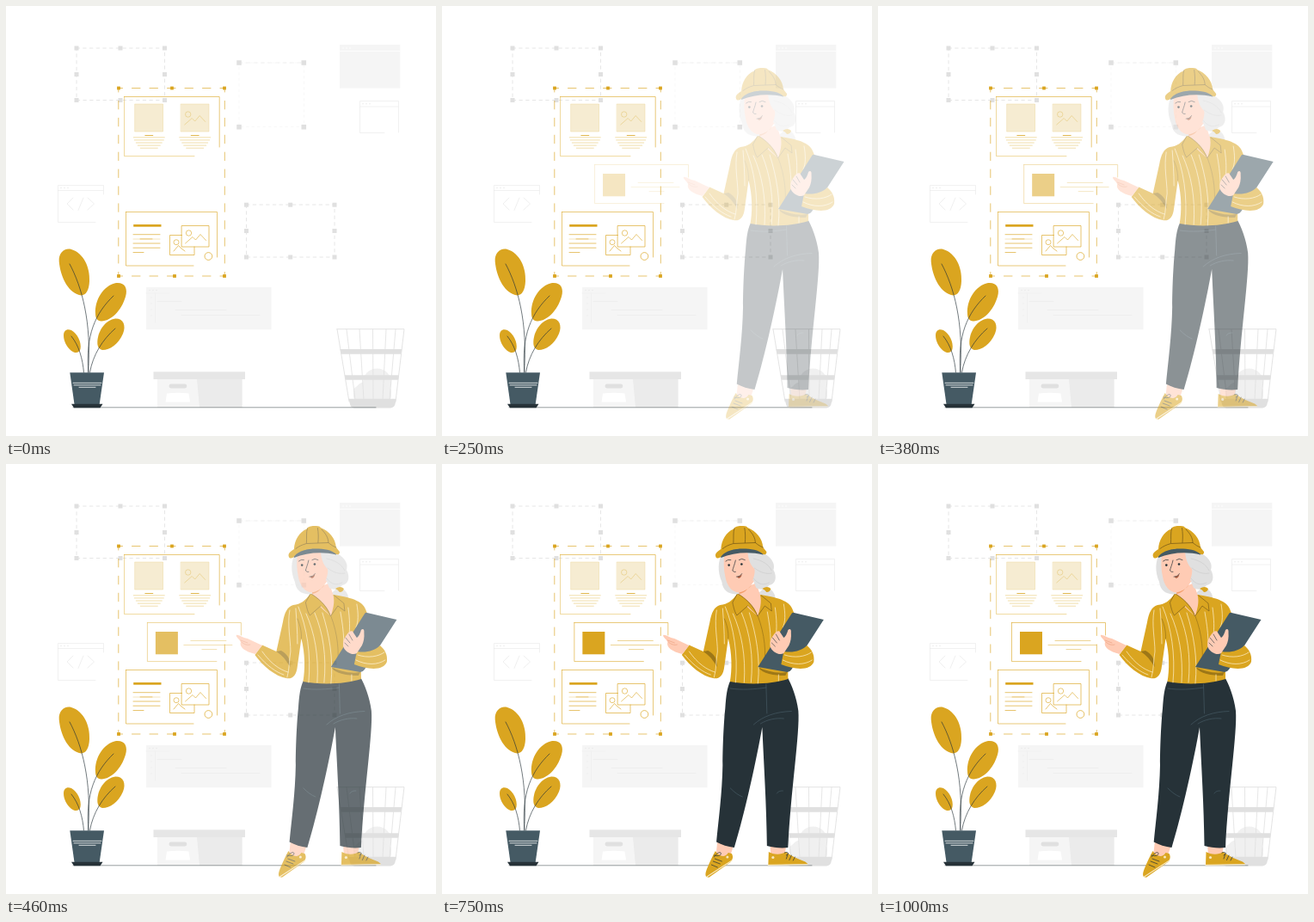
An HTML page for the animation above (1040 ms loop, 500x500 px).

```html
<!DOCTYPE html>
<html lang="en">
<head>
<meta charset="utf-8">
<title>Layout builder</title>
<style>
html, body { margin: 0; width: 100%; height: 100%; overflow: hidden; background: #fff; }
svg { display: block; width: 100vw; height: 100vh; }
.line { fill: none; stroke-linecap: round; stroke-linejoin: round; }
</style>
</head>
<body>
<svg id="stage" viewBox="0 0 500 500">
  <g id="back"></g>
  <g id="basket"></g>
  <g id="plant"></g>
  <g id="board"></g>
  <g id="mover"></g>
</svg>
<script>
const GOLD = '#daa520', DARK = '#263238', SLATE = '#455a64', SKIN = '#ffcbb4',
      HAIR = '#e0e0e0', GREY = '#e0e0e0', PALE = '#f5f5f5', MIST = '#ebebeb', CREAM = '#f8e7bd';

const fill = (d, c) => `<path d="${d}" fill="${c}"/>`;
const line = (d, c, w = 0.7, extra = '') =>
  `<path class="line" d="${d}" stroke="${c}" stroke-width="${w}" ${extra}/>`;
const rect = (x, y, r, b, c, rx = 0) =>
  `<rect x="${x}" y="${y}" width="${r - x}" height="${b - y}" rx="${rx}" fill="${c}"/>`;
const dot = (x, y, r, c) => `<circle cx="${x}" cy="${y}" r="${r}" fill="${c}"/>`;
const ring = (x, y, r, c, w = 0.6) =>
  `<circle cx="${x}" cy="${y}" r="${r}" fill="none" stroke="${c}" stroke-width="${w}"/>`;
const box = (x, y, r, b) => `M${x} ${y}H${r}V${b}H${x}Z`;
const put = (id, parts) => document.getElementById(id).innerHTML = parts.join('');

// Square handles on the rim of a selection
function handles(xs, ys, size, color) {
  let out = '';
  xs.forEach((x, i) => ys.forEach((y, j) => {
    if (xs.length === 3 && ys.length === 3 && i === 1 && j === 1) return;
    out += rect(x - size / 2, y - size / 2, x + size / 2, y + size / 2, color);
  }));
  return out;
}

// Rows given as [y, left, right]
const rows = (list, c, w = 0.6) =>
  list.map(([y, l, r]) => line(`M${l} ${y}H${r}`, c, w)).join('');

const dots = (x, y, c) => [0, 4, 8].map(d => dot(x + d, y, 0.8, c)).join('');

// Frame whose lower right corner is left open
const frame = (x, y, r, b, stopX, stopY, soft) =>
  line(`M${stopX} ${b}H${x}V${y}`, soft, 0.6) + line(`M${x} ${y}H${r}V${stopY}`, GOLD, 0.6);

const picture = (x, y, c) => ring(x, y, 3.2, c) +
  line(`M${x - 4} ${y + 12}L${x + 4.5} ${y + 4.5}L${x + 8} ${y + 8}L${x + 13.5} ${y + 1.5}L${x + 20} ${y + 8.5}`, c, 0.6);

put('back', [
  line(box(82, 49, 184.5, 109.5), GREY, 0.8, 'stroke-dasharray="3.5 4.2"'),
  handles([82, 133, 184.5], [49, 79.5, 109.5], 5, GREY),
  line(box(271, 66, 346.5, 140.5), '#f3f3f3', 0.6, 'stroke-dasharray="2.5 4"'),
  line('M271 66H346', MIST, 0.7, 'stroke-dasharray="4 4.5"'),
  handles([271, 346.3], [66, 140.7], 5.6, GREY),
  line(box(279.5, 231, 382, 292), GREY, 0.8, 'stroke-dasharray="3.5 4.2"'),
  handles([279.5, 330.7, 382], [231.2, 261.5, 292], 5, GREY),
  rect(388, 45, 458.3, 95.6, PALE),
  line('M388 52.5H458', '#fff', 0.8), dots(392, 49, '#fff'),
  line('M440 147.5H411.5V110.5H456.5V147M411.5 117H456', MIST), dots(415, 113.8, MIST),
  line('M104 251.5H60.5V208.5H113.5V219M60.5 214.5H113', MIST), dots(64, 211.5, MIST),
  line('M78 223L71 230L78 237M90 223L84 237.5M95 223L102.5 230L95 237', MIST, 0.8),
  rect(163, 327, 308.6, 376.2, PALE),
  dots(167, 330.5, MIST), line('M163 334H190M173.5 334V368', '#eee'),
  [339, 346, 353, 360].map(y => line(`M168 ${y}h2`, MIST)).join(''),
  rows([[343.5, 176, 204], [353.5, 197, 256], [359.5, 204, 295]], '#ececec', 0.8),
  rect(176, 434, 226, 467, PALE),
  fill('M222 434H274.6V467H225Z', MIST),
  rect(171.5, 425.3, 278, 434, '#e6e6e6'),
  rect(189.5, 439.6, 210.3, 444.5, GREY, 2.4),
  fill('M187 450.5Q200 449 212.5 450.5L214 460.5H185.5Z', '#fff')
]);

put('basket', [
  dot(431.5, 438, 16.5, '#f0f0f0'), dot(418, 449, 12, '#f0f0f0'), rect(404, 442, 448, 460, '#f0f0f0', 6),
  line('M385 375.7H463L453 460M385 375.7L399 460', GREY, 0.9),
  [[396, 406], [411, 416], [426.5, 427], [442, 438], [453, 446]]
    .map(([a, b]) => line(`M${a} 376L${b} 458`, GREY, 0.8)).join(''),
  fill('M388.5 399H460.2L459.5 404.7H389.6Z', GREY),
  fill('M393.7 429.2H456.7L456 434.8H394.8Z', GREY),
  fill('M398.5 456.8H453.7L452.5 463Q451 467.4 447 467.4H405Q401 467.4 400 463Z', GREY),
  line('M78 466.8H430', '#6b7376')
]);

put('plant', [
  fill('M61.7 297C61 287 68 281 76 283C90 287 98 304 97 320C96.5 332 92 338 85 336C71 332 63 313 61.7 297Z', GOLD),
  fill('M104 358C103 342 113 325 128 322C138 321 142 328 139 338C134 355 122 366 111 366.5C106 366 104 363 104 358Z', GOLD),
  fill('M106.3 390C107 377 116 365 127 363.5C136 363 140 371 136 381C131 393 121 400 112 400C108 399 106 396 106.3 390Z', GOLD),
  fill('M67 383C67 377 71 375 76 377C83 381 88 391 86.5 399C85 404 80 404 76 401C70 396 67 389 67 383Z', GOLD),
  line('M74 300C88 326 100 368 95.5 426M125 337C104 357 92 383 96 426M127 375C112 388 101 406 97.5 426M76 384C85 395 89 410 90.5 426', DARK, 0.65),
  fill('M74.3 426.3H114L108.7 463H79.5Z', SLATE),
  fill('M76 462.7H112.5L109.5 467.3H79Z', DARK),
  rows([[438.3, 78, 111], [440.8, 79, 110], [443.3, 85, 104]], '#fff', 0.8)
]);

const blurb = x => rows([[150.5, x - 4.5, x + 4.5]], GOLD, 0.8) +
  [18, 17, 15, 13, 10].map((half, i) =>
    line(`M${x - half} ${152.8 + i * 3.1}H${x + half}`, '#e5c266', 0.55)).join('');
const thumb = x => rect(x, 114, x + 32.5, 146, '#f6ecd2') + line(box(x, 114, x + 32.5, 146), '#ecd79d', 0.5);

put('board', [
  line('M131 95.5H254M131 314H254', GOLD, 0.65, 'stroke-dasharray="9.5 11" stroke-dashoffset="5"'),
  line('M130.8 95.5V314M254.3 95.5V314', GOLD, 0.65, 'stroke-dasharray="9.5 10.4" stroke-dashoffset="5"'),
  handles([131, 254], [95.5, 314], 3.8, GOLD),
  handles([193], [95.5], 3.8, GOLD), handles([196], [314], 3.8, GOLD),
  frame(137.5, 105.5, 248.2, 174.6, 219, 164, '#e4bf5e'),
  thumb(150), thumb(203.5), picture(211.7, 126, '#e4c878'),
  blurb(166.3), blurb(219.7),
  frame(139.5, 239.5, 245.5, 302, 218, 292, GOLD),
  rect(148.2, 254, 180.5, 256.7, GOLD),
  rows([[265.7, 148, 179], [270.9, 156, 170], [276, 148, 179], [281.2, 148, 179], [286.5, 148, 160]], GOLD, 0.65),
  rows([[271, 148, 179]], '#e8c979', 0.5),
  line('M204.5 266.5H190.5V289.5H219V280', GOLD, 0.65),
  ring(198, 274.7, 3, GOLD), line('M195 285L200.5 278.5L204 282L208 285', GOLD, 0.65),
  line(box(204.5, 255.5, 236, 280), GOLD, 0.65), picture(212.5, 264, GOLD),
  ring(235.4, 291, 4.4, GOLD, 0.7)
]);

const card = [
  frame(155.5, 184.5, 264.5, 229.6, 236, 199, GOLD),
  rect(165, 195, 191, 221.3, GOLD),
  rows([[205.5, 206, 247], [210.5, 198, 254], [215.6, 219, 236]], '#e3bd5a', 0.65)
];

const legs = [
  fill('M322 438L320.5 452L328 459L337 455L341 443Z', SKIN),
  fill('M383 442L384 455L400 456L402 443Z', SKIN),
  fill('M319.5 450C316 456 313 463 310 470C308 475 307.5 478 309 480L312 480.8L337 463C340 460 340.5 456 338.5 453L334.5 452C331 458 324 457 319.5 450Z', GOLD),
  line('M309.5 480L338.8 461', CREAM, 1.1),
  line('M318 457C321 452 326 450 326 453C326 456 321 456 318 455M317 462L325 465M319 459L327 462M315 466L322 469', DARK),
  dot(333.5, 457, 1.5, CREAM),
  fill('M381.5 451C386 454 396 455 401 451C408 456 417 460 424 462.5L427 465L381 466.5Z', GOLD),
  line('M381 466.3L426.5 465.7', CREAM, 1.3),
  line('M400 452C404 450 406 453 402 455M404 453L402 459M408 455L405.5 460.5M412 457L410 461', DARK),
  dot(386.5, 457.5, 1.6, CREAM),
  fill('M337 252L403 247.5C408 256 414 271 416 287C418 312 407 382 404 446C396 447 387 446 379.5 444C379 396 376 352 374 306C367 345 354 405 341.5 446C334 445 327 443 320.7 439.5C323 416 327.500 382 328 350C328 326 329.500 298 331 284C332 270 333 260 337 252Z', DARK),
  line('M337 261C350 263 365 262 378.5 260M378.500 256L379.5 290M364 303C375 293 390 288 408 287.500M372 302C380 297 390 295 399 296M337 377C342 382 346 385 351 387M391 383C393 380 396 380 398 380', SLATE)
];

const torso = [
  fill('M370 150C376 143 384 143 388 151C390 156 389 161 387 164L370 158Z', HAIR),
  // shirt, with the pointing sleeve
  fill('M345 151C339 159 334 163 325 164C318 166 315 173 313 184L305.5 218L289 210.5L280.5 222C290 235 304 247 318 249.3C325 250 329 245 330 235L334.500 203C339 220 339 240 336.5 253C357 257 386 256 404 250L404 238C421 230 424 204 410 171C407 160 396 156 372 152Z', GOLD),
  fill('M305.5 218L311 217C318 221 322 226 321.5 236C317 228 312 222 305.5 218Z', '#9d7717'),
  fill('M369 236C379 241 391 244 403 242L401 246C388 246 374 244 369 236Z', '#9d7717'),
  line('M321 170C318 187 322 204 322 218C320 229 321 238 318 248M328 168C329 182 330 194 330 209M289 218C299 232 309 239 319 242M284 222C295 235 305 242 314 245', '#fff1cf', 0.7),
  line('M331 166C341 190 346 221 343 254M340 174C350 196 355 223 353 254M350 173C360 197 364 224 361 254M359 173C367 198 372 226 369 255M380 172C384 195 386 214 381 235M389 167C391 182 391 190 390 200M399 163C401 174 401 184 398 190M393 245V252', '#fff1cf', 0.7),
  line('M369 177C377 198 379 220 376 237M334.500 203C335 195 333 187 330 180', '#8c6a16', 0.6),
  // neck and collar
  fill('M346 147L368 138C369 147 372 154 376 159L369 177C360 170 352 162 346 152Z', SKIN),
  fill('M344.5 147C351 149 358 146 362 140L357 145C354 149 350 151 345 151Z', '#f29d68'),
  fill('M345 150.5C353 155 364 163 369 177L357 165L345 176L339.5 162Z', GOLD),
  fill('M371.5 152L384 161L385 170L377 165L369 177C371 169 374 161 371.5 152Z', GOLD),
  line('M345 151L339.5 161C341 168 342 172 344.5 176L357 165M346 151C354 156 364 164 368.5 177L377 165L385 171L384 162L373 153', '#76581a', 0.65),
  // pointing hand
  fill('M289 211L272 203C266 202 261 198 259 199C258 201 262 203 264 207C262 213 269 218 281 221Z', SKIN),
  line('M265 207C268 210 272 211 275 210M264 205L272 208', '#e99c7b', 0.6),
  // tablet, arm and hand
  fill('M411 173Q409 172 407.5 175L369 236L403 242Q406 242 408 239L445.5 181Z', SLATE),
  fill('M426 211C432 216 435 222 434 230C430 241 411 239 396 233L399 218C410 220 420 217 426 211Z', GOLD),
  line('M400 222C412 226 424 224 431 219M398 228C410 234 423 234 432 228', '#fff1cf', 0.7),
  fill('M399 220C394 223 387 219 384 214C382 208 384 203 387 199C390 194 394 193 395 196L399 202C401 201 403 197 404 193C406 191 408 192 407.5 196C408 202 407 207 405 211Z', SKIN),
  line('M386 202L391 208M390 198L394 205M385 208L389 212', DARK, 0.6)
];

const head = [
  fill('M328 104C322 112 322 126 327 137C328 147 336 153 347 151L352 103Z', HAIR),
  fill('M355 103L376 104C387 110 389 118 387 123C392 132 389 140 382 141C378 146 372 147 367 144L360 127Z', HAIR),
  fill('M330 104L361 101C361 111 363 116 365 120C369 120 370 128 366 133C362 142 354 149 346 149.5C338 148 333 142 331 131C329 122 329 114 330 104Z', SKIN),
  fill('M357 102C358 114 362 119 365 122C366 127 364 131 363 136C369 135 371 128 371 122L374 102Z', HAIR),
  line('M364 110C374 112 382 117 385 124M365 121C373 127 379 128 385 127M364 133C370 141 376 141 382 138', '#c9c9c9', 0.6),
  fill('M374 145Q380 141 384 145Q383 149 379 149Q377 146 374 145Z', GOLD),
  dot(335.3, 117.6, 1.3, DARK), dot(350, 116.5, 1.3, DARK),
  line('M331.5 113Q334 110.5 337.5 111.5M347 111.5Q350 109 354 111.5M343 112C342 117 340 121 339.5 124Q341 126 343 125.5', DARK),
  fill('M344.5 131.300Q348 131.5 350.500 128Q349.500 132.500 346.5 132.800Z', '#a85b3f'),
  line('M344 131.200Q348 131.5 350.500 127.5', DARK, 0.6),
  // helmet: band below the brim, then the shell
  fill('M325 104C337 98 358 95 377 100L375 105.500C360 101.500 341 102.500 326 109Z', SLATE),
  fill('M320 108C318.500 104 322 101.500 326 99C326.500 89 332 79 341 75.500C342 72.8 346 72 349 72C353 72 356 72 357 74C367 78 374 86 375 97L379 102C379.500 105 377 106 374.500 104.500C370 100 361 98.500 351 98.500C341 98.500 332 101 327 106.500C325 110 321 110.500 320 108Z', GOLD),
  line('M341.500 75C340 80 341 86 340.5 92M353.5 74.500C354.500 80 354.500 86 354 91.500M328 98.500C331 96 335 94 340.5 92.500L366 91.500C369 94 372 96 375 97M358 76C363 81 366 86 366 91.500', '#6f5316')
];

put('mover', [...card, ...legs, ...torso, ...head]);

// Bezier (.36, -.01, .5, 1.38): a slide that overshoots and settles
function ease(t) {
  if (t >= 1) return 1;
  const curve = (a, b, s) => 3 * (1 - s) ** 2 * s * a + 3 * (1 - s) * s * s * b + s ** 3;
  let lo = 0, hi = 1;
  for (let i = 0; i < 24; i++) {
    const mid = (lo + hi) / 2;
    if (curve(0.36, 0.5, mid) < t) lo = mid; else hi = mid;
  }
  return curve(-0.01, 1.38, lo);
}

const LOOP = 1040, FPS = 24, SHIFT = 30;
const mover = document.getElementById('mover');

function draw(now) {
  // 24 steps a second on a 10 ms grid, each taken at its middle
  const tick = Math.floor((now % LOOP) / 10);
  const step = Math.floor((tick + 0.499) * FPS / 100);
  const p = step < 2 ? 0 : ease((step + 0.5) / FPS);
  mover.setAttribute('opacity', Math.min(1, Math.max(0, p)));
  mover.setAttribute('transform', `translate(${SHIFT * (1 - p)} 0)`);
}

const start = performance.now();
function loop() {
  draw(performance.now() - start);
  requestAnimationFrame(loop);
}
loop();
</script>
</body>
</html>
```
